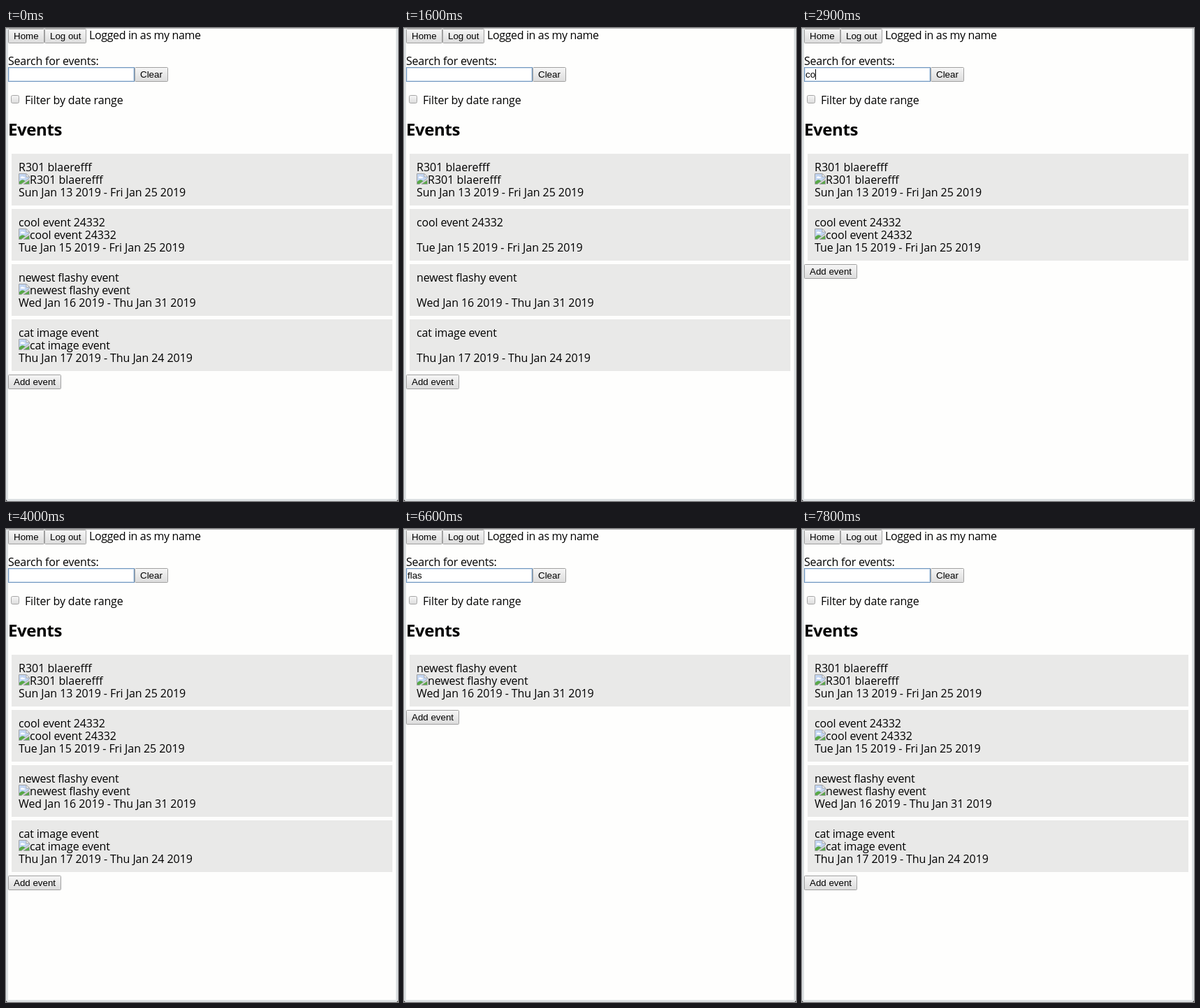
Write an HTML page that moves like this. It is 561 px wide and 677 px high and loops after 8000 ms.

```html
<!DOCTYPE html>
<html lang="en">
<head>
<meta charset="utf-8">
<title>Event search</title>
<style>
html, body { margin: 0; width: 100%; height: 100%; overflow: hidden; background: #fefefd; }
svg { display: block; }
text { font: 16px "Open Sans", "Noto Sans", sans-serif; white-space: pre; }
.ui { font: 13.333px "Liberation Sans", Arial, sans-serif; }
.title { font-size: 24px; font-weight: bold; }
</style>
</head>
<body>
<svg width="561" height="677" viewBox="0 0 561 677">
  <defs>
    <linearGradient id="face" x2="0" y2="1">
      <stop stop-color="#f6f6f6"/><stop offset="1" stop-color="#dcdcdc"/>
    </linearGradient>
    <g id="broken">
      <path d="M.5 .5H11L15.5 5V7L4 15.5H.5Z" fill="#c3d6f2" stroke="#a3a5a8"/>
      <path d="M3 6.5a2 2 0 0 1 3.500-1.500a1.800 1.800 0 0 1 2.500 2H3Z" fill="#fff"/>
      <path d="M1 15V12Q5 7 9.500 11L4 15Z" fill="#58a846"/>
      <path d="M11 .5V5H15.500Z" fill="#fff" stroke="#a3a5a8"/>
      <path d="M15.500 9.500V15.500H7Z" fill="#58a846" stroke="#a3a5a8"/>
    </g>
  </defs>
  <path d="M0 0H561V677H0Z" fill="#dce0e2"/>
  <path d="M3 0H558V674H3Z" fill="#fefefd"/>
  <path d="M0 0H561V1H0Z" fill="#b2b2b2"/>
  <path d="M0 677V675L2 677ZM561 677V675L559 677Z" fill="#444"/>
  <rect x="3.500" y="56.500" width="180" height="20" fill="#fff" stroke="#7298c0"/>
  <rect x="4.500" y="57.500" width="178" height="18" fill="none" stroke="#d5e2ef"/>
  <rect x="7.500" y="96.500" width="11" height="11" rx="2" fill="url(#face)" stroke="#a5a5a5"/>
  <g id="fixed"></g>
  <g id="live"></g>
</svg>
<script>
const LOOP = 8000;
const EVENTS = [
  ['R301 blaerefff', 'Sun Jan 13 2019 - Fri Jan 25 2019', 0],
  ['cool event 24332', 'Tue Jan 15 2019 - Fri Jan 25 2019', -.15],
  ['newest flashy event', 'Wed Jan 16 2019 - Thu Jan 31 2019', -.16],
  ['cat image event', 'Thu Jan 17 2019 - Thu Jan 24 2019', -.16]
];
const ALL = [0, 1, 2, 3];

// start ms, query, listed events, caret shown, slots whose image is still loading
const STEPS = [
  [0, '', ALL, 0],
  [100, '', ALL, 1],
  [500, 'b', [0], 1],
  [600, 'bl', [0], 1],
  [800, 'bla', [0], 1],
  [1400, 'bla', [0], 0],
  [1600, '', ALL, 0, [1, 2, 3]],
  [1700, '', ALL, 0],
  [2000, '', ALL, 1],
  [2600, 'c', [0, 1, 3], 1, [2]],
  [2700, 'c', [0, 1, 3], 1],
  [2900, 'co', [0, 1], 1],
  [3000, 'coo', [1], 1],
  [3300, 'cool', [1], 1],
  [3900, '', ALL, 0, ALL],
  [4000, '', ALL, 0],
  [4500, '', ALL, 1],
  [5100, '', ALL, 0],
  [5700, 'f', [0, 1, 2], 1],
  [5900, 'fla', [2], 1, [0]],
  [6000, 'flas', [2], 1],
  [6600, 'flas', [2], 0],
  [6900, '', ALL, 0],
  [7200, '', ALL, 1],
  [7800, '', ALL, 0]
];

const fixed = document.getElementById('fixed');
const live = document.getElementById('live');
const pen = document.createElement('canvas').getContext('2d');
pen.font = '13.333px "Liberation Sans", Arial, sans-serif';

const label = (x, y, str, spacing = 0, cls = '') =>
  `<text x="${x}" y="${y}" class="${cls}" letter-spacing="${spacing}">${str}</text>`;

const button = (x, y, w, str) =>
  `<rect x="${x + .5}" y="${y + .5}" width="${w - 1}" height="20" rx="1" fill="url(#face)" stroke="#a0a0a0"/>` +
  label(x + 8, y + 15, str, 0, 'ui');

function card([name, dates, spacing], slot, loading) {
  const y = 180 + slot * 79;
  const image = loading ? '' :
    `<use href="#broken" x="18" y="${y + 28}"/>` + label(34, y + 43, name, spacing);
  return `<rect x="8" y="${y}" width="545" height="74" fill="#e9e9e8"/>` +
    label(18, y + 25, name, spacing) + image + label(18, y + 61, dates, -.07);
}

function draw([, query, list, caret, loading = []]) {
  const x = Math.round(5 + pen.measureText(query).width);
  live.innerHTML = label(5, 71, query, 0, 'ui') +
    (caret ? `<rect x="${x}" y="59" width="1" height="15"/>` : '') +
    list.map((id, slot) => card(EVENTS[id], slot, loading.includes(slot))).join('') +
    button(3, 180 + list.length * 79, 76, 'Add event');
}

fixed.innerHTML = button(3, 1, 52, 'Home') + button(55, 1, 60, 'Log out') +
  button(184, 56, 48, 'Clear') +
  label(119, 16, 'Logged in as my name', -.36) +
  label(3, 53, 'Search for events:', -.2) +
  label(27, 109, 'Filter by date range', -.15) +
  label(3, 154, 'Events', -.4, 'title');

let shown;
function tick() {
  const t = performance.now() % LOOP;
  const step = STEPS.findLast(s => s[0] <= t);
  if (step !== shown) draw(shown = step);
  requestAnimationFrame(tick);
}
tick();
</script>
</body>
</html>
```
